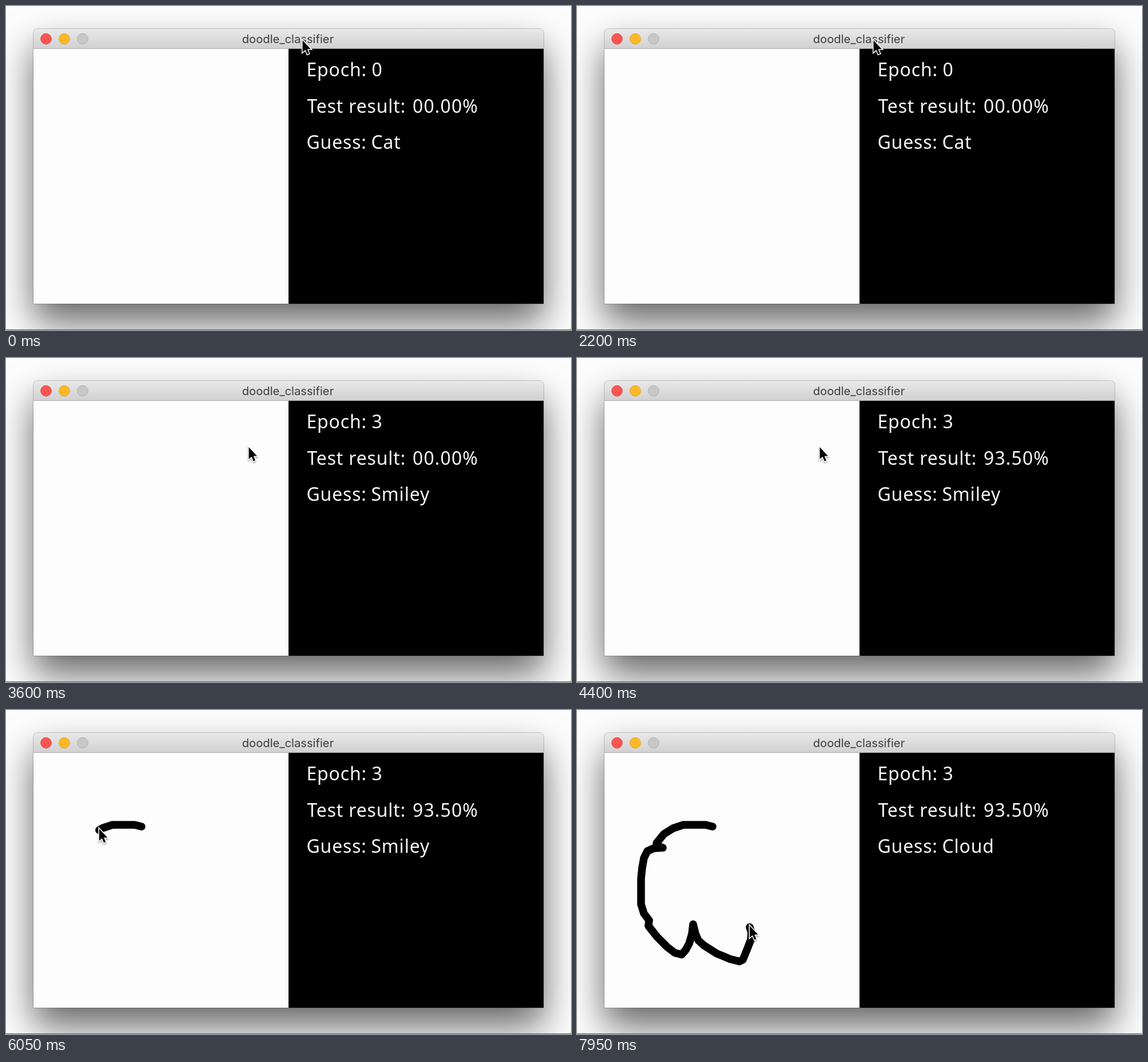
Write an HTML page that moves like this. It is 988 px wide and 567 px high and loops after 8 s.

```html
<!DOCTYPE html>
<html lang="en">
<head>
<meta charset="utf-8">
<title>doodle_classifier</title>
<style>
  html, body { margin: 0; width: 100%; height: 100%; overflow: hidden; background: #fdfdfd; }
  .window {
    position: absolute; left: 48px; top: 40px; width: 892px; height: 481px;
    border-radius: 7px 7px 0 0;
    box-shadow: 0 0 0 1px rgba(0, 0, 0, .18), 0 32px 64px rgba(0, 0, 0, .6);
  }
  svg { position: absolute; left: 0; top: 0; display: block; }
  .title { font: 20.2px Inter, sans-serif; fill: #3c3c3c; text-anchor: middle; }
  .info { font: 32px "Noto Sans", sans-serif; fill: #f8f8f8; letter-spacing: .8px; }
  .info .digits { letter-spacing: 1.1px; }
  .ink { fill: none; stroke: #000; stroke-width: 13.5; stroke-linecap: round; stroke-linejoin: round; }
  #cursor { filter: drop-shadow(0 2px 1.5px rgba(0, 0, 0, .35)); }
</style>
</head>
<body>
<div class="window"></div>
<svg width="988" height="567" viewBox="0 0 988 567">
  <defs>
    <linearGradient id="bar" x1="0" y1="0" x2="0" y2="1">
      <stop offset="0" stop-color="#e9e9e9"/>
      <stop offset="1" stop-color="#d0d0d0"/>
    </linearGradient>
  </defs>
  <rect y="566" width="988" height="1" fill="#5c6052"/>

  <path d="M48 75V47a7 7 0 0 1 7-7H933a7 7 0 0 1 7 7V75Z" fill="url(#bar)"/>
  <rect x="48" y="74" width="892" height="1" fill="#adadad"/>
  <circle cx="70" cy="57.5" r="9.3" fill="#fc5550" stroke="#e0443f"/>
  <circle cx="102" cy="57.5" r="9.3" fill="#fdb924" stroke="#e0a02c"/>
  <circle cx="134" cy="57.5" r="9.3" fill="#c8c8c8" stroke="#afafaf"/>
  <text class="title" x="493" y="65">doodle_classifier</text>

  <rect x="48" y="75" width="446" height="446" fill="#fdfdfd"/>
  <rect x="494" y="75" width="446" height="446"/>

  <g class="info">
    <text x="525.5" y="123">Epoch:</text>
    <text x="639.5" y="123" id="epoch"></text>
    <text x="526.5" y="187">Test result:</text>
    <text x="711" y="187" id="result" class="digits"></text>
    <text x="525.5" y="250">Guess:</text>
    <text x="638.5" y="250" id="guess"></text>
  </g>

  <path class="ink" d="M237 204L225 201H186L168 207L152 217L139 233L140 238L150 241L134 242L123 247L117 259L114 276L112 295V340L117 356L126 368"/>
  <path class="ink" d="M126 368L125 378L140 397L158 415L171 425L183 428L190 420L196 409L201 392L203 375L207 391L212 403L222 412L244 426L268 436L284 440L290 437L297 420L304 402L305 389L302 380"/>

  <path id="cursor" d="M0 0V21L5 16.8L8.2 24.6L11.5 23.2L8.2 15.5H14.5Z" stroke="#fff" stroke-width="3" paint-order="stroke"/>
</svg>
<script>
  const LOOP = 8000, STEP = 50;
  const byId = id => document.getElementById(id);

  // Each label holds its value from the given time on.
  const labels = {
    epoch: [[0, "0"], [2450, "1"], [2750, "2"], [3050, "3"]],
    result: [[0, "00.00%"], [4300, "93.50%"]],
    guess: [[0, "Cat"], [3050, "Smiley"], [6150, "Cloud"]]
  };

  const moves = [
    [0, 518.5, 60], [2650, 518.5, 60], [3500, 424.5, 156],
    [4400, 424.5, 156], [5200, 195.5, 151.5], [5750, 237, 201.5]
  ];

  const strokes = [...document.querySelectorAll(".ink")].map((path, i) => ({
    path, start: 5750 + i * 1100, end: 6850 + i * 1100, length: path.getTotalLength()
  }));

  const clamp = v => Math.min(1, Math.max(0, v));
  const ease = v => v * v * (3 - 2 * v);
  const latest = (list, t) => list.filter(entry => entry[0] <= t).pop();

  function pointerAt(t) {
    const from = latest(moves, t);
    const to = moves[moves.indexOf(from) + 1] || from;
    const k = to === from ? 0 : ease((t - from[0]) / (to[0] - from[0]));
    return { x: from[1] + (to[1] - from[1]) * k, y: from[2] + (to[2] - from[2]) * k };
  }

  function render(t) {
    for (const id in labels) byId(id).textContent = latest(labels[id], t)[1];
    let tip = pointerAt(t);
    for (const { path, start, end, length } of strokes) {
      const drawn = clamp((t - start) / (end - start)) * length;
      path.style.visibility = drawn > 0 ? "visible" : "hidden";
      path.style.strokeDasharray = `${drawn} ${length + 50}`;
      if (drawn > 0) {
        const p = path.getPointAtLength(drawn);
        tip = { x: p.x, y: p.y - 2.5 };
      }
    }
    byId("cursor").setAttribute("transform", `translate(${tip.x} ${tip.y})`);
  }

  const origin = performance.now();
  function tick() {
    const t = (performance.now() - origin) % LOOP;
    render(Math.floor(t / STEP) * STEP);
    requestAnimationFrame(tick);
  }
  tick();
</script>
</body>
</html>
```
